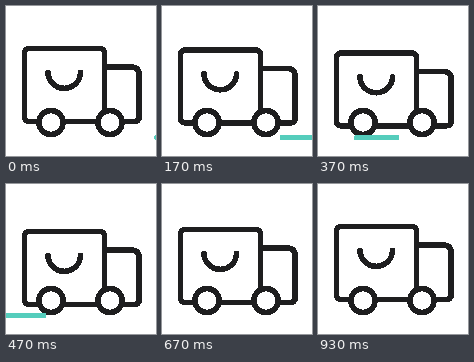
Write an HTML page that moves like this. It is 150 by 150 pixels and loops after 1.01 s.

```html
<!DOCTYPE html>
<html lang="en">
<head>
<meta charset="utf-8">
<title>Delivery truck</title>
<style>
  html, body { margin: 0; width: 100%; height: 100%; overflow: hidden; background: #fff; }
  svg { display: block; width: 100vw; height: 100vh; }
</style>
</head>
<body>
<svg viewBox="0 0 150 150" fill="none" stroke="#1e1e1f" stroke-width="5.6" stroke-linecap="round" stroke-linejoin="round" shape-rendering="crispEdges">
  <g id="body">
    <rect x="18.5" y="42.5" width="80" height="73" rx="4.5"/>
    <path d="M98.5 61H125Q133.2 61 133.2 69V110Q133.2 115.5 128 115.5H98.5"/>
    <path d="M42 66.3A16.2 16 0 0 0 74.5 66.3"/>
  </g>
  <g fill="#fff">
    <circle cx="45" cy="116.5" r="12"/>
    <circle cx="104" cy="116.5" r="12"/>
  </g>
  <path id="road" d="M-20 131.6H20" stroke="#55cdbc"/>
</svg>
<script>
  const LOOP = 1010, FPS = 30, LAST = 28;
  const DIP = 5, HALF = 14;
  const ROAD = { from: 171, to: -24.5, steps: 20 };
  const body = document.getElementById('body');
  const road = document.getElementById('road');

  const ease = u => {
    u = Math.min(1, Math.max(0, u));
    return u * u * (3 - 2 * u);
  };

  function draw(ms) {
    // Held steps at 30 per second, with a pause on the last one
    const step = Math.min(LAST, Math.floor((ms % LOOP + 4) * FPS / 1000));
    const dip = DIP * ease(1 - Math.abs(step - HALF) / HALF);
    const x = ROAD.from + (ROAD.to - ROAD.from) * ease(step / ROAD.steps);
    body.setAttribute('transform', `translate(0 ${dip})`);
    road.setAttribute('transform', `translate(${x} 0)`);
  }

  let start;
  function tick(now) {
    start ??= now;
    draw(now - start);
    requestAnimationFrame(tick);
  }
  draw(0);
  requestAnimationFrame(tick);
</script>
</body>
</html>
```
